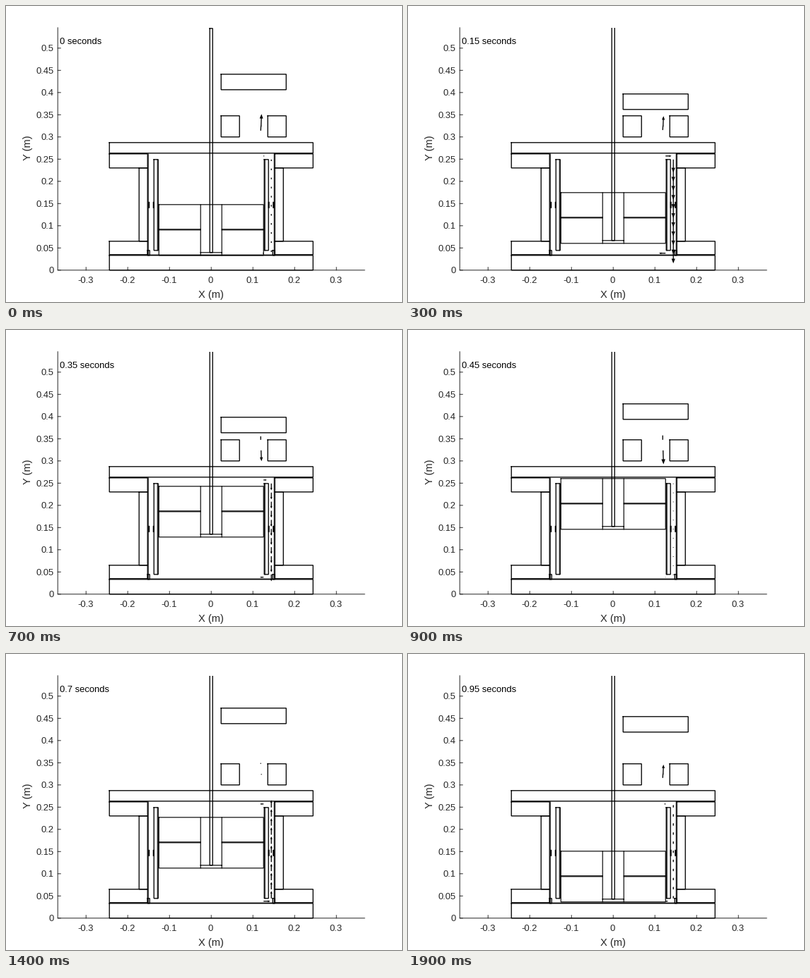
These frames come from a looping animation (560 by 420 pixels, 2000 ms). A matplotlib script:

```python
import numpy as np
import matplotlib.pyplot as plt
from matplotlib.animation import FuncAnimation
from matplotlib.collections import LineCollection, PolyCollection

W, H, DPI = 560, 420, 100
FRAMES, STEP = 20, 100
PX = 72 / DPI
GREY = "#262626"
LEFT, TOP, RIGHT, BASE, MID = 73, 30, 507, 374, 290
DX, DY = 0.2, 0.8  # where a whole coordinate falls inside its pixel
LINE = 1.33

plt.rcParams["font.family"] = "Liberation Sans"
plt.rcParams["path.snap"] = False
fig = plt.figure(figsize=(W / DPI, H / DPI), dpi=DPI, facecolor="white")
ax = fig.add_axes([0, 0, 1, 1])
ax.set_xlim(-DX, W - DX)
ax.set_ylim(H - DY, -DY)
ax.axis("off")


def path(xs, ys, color="black", width=LINE):
    return ax.plot(xs, ys, color=color, lw=width * PX, snap=False,
                   solid_capstyle="projecting", solid_joinstyle="miter")[0]


def box_points(x0, y0, x1, y1):
    return [x0, x1, x1, x0, x0], [y0, y0, y1, y1, y0]


def box(x0, y0, x1, y1):
    return path(*box_points(x0, y0, x1, y1))


def mirrored(x0, y0, x1, y1):
    box(x0, y0, x1, y1)
    box(2 * MID - x1, y0, 2 * MID - x0, y1)


def label(x, y, text, size=13, color=GREY, ha="center", va="baseline", **kw):
    """Text placed relative to pixel centres."""
    return ax.text(x - 0.5 - DX, y + 0.5 - DY, text, fontsize=size * PX,
                   color=color, ha=ha, va=va, **kw)


def draw_axes():
    path([LEFT, LEFT, RIGHT], [TOP, BASE, BASE], GREY, 1)
    for i in range(11):
        y = BASE - 31.5 * i
        path([LEFT, LEFT + 4], [y, y], GREY, 1)
        label(68, y + 5, f"{0.05 * i:g}", ha="right")
    for i in range(-3, 4):
        x = MID + 59 * i
        path([x, x], [BASE, BASE - 4], GREY, 1)
        label(x, 393, f"{0.1 * i:g}")
    label(MID, 414, "X (m)", 14.67)
    label(32, 201, "Y (m)", 14.67, va="center", rotation=90)


def draw_housing():
    box(146, 193, 434, 208)
    box(146, 353, 434, 374)
    path([200, 380], [352.5, 352.5])
    mirrored(146, 209, 200, 229)
    mirrored(188, 229, 200, 333)
    mirrored(146, 333, 200, 352)
    mirrored(200, 346, 203, 353)
    mirrored(209, 217, 215, 346)
    for x in (201, 214, 366, 379):
        y0, y1 = (209, 352) if x in (201, 379) else (217, 346)
        path([x, x], [y0, y1], width=1)
    for x in (202, 208.5, 371.5, 378):
        path([x, x], [278, 285], width=2)
    box(304, 155, 330, 185)
    box(370, 155, 396, 185)


draw_axes()
draw_housing()

clock = label(77, 54, "", color="black", ha="left")
shell, upper, lower, core = [path([], [], width=1.15) for _ in range(4)]
rod, block = path([], []), path([], [])
clip = plt.Rectangle((0, TOP), W, H, transform=ax.transData)
rod.set_clip_path(clip)
shafts = ax.add_collection(LineCollection([], colors="black",
                                          linewidths=LINE * PX,
                                          capstyle="butt"))
heads = ax.add_collection(PolyCollection([], facecolors="black",
                                         edgecolors="none"))
shafts.set_snap(False)


def arrow(x, y, dx, dy, segs, tris):
    """Add a shaft and a narrow filled head."""
    tail, step = np.array([x, y]), np.array([dx, dy])
    tip = tail + step
    neck = tip - 0.36 * step
    side = np.array([-dy, dx]) * 0.14
    segs.append([tail, tip - 0.15 * step])
    tris.append([tip, neck + side, neck - side])


def flow(a):
    """Gas speed in the regenerator duct, positive downwards."""
    return (1.5 + 15 * np.sin(a) + 2.5 * np.cos(a)
            + 3 * np.sin(2 * a) - 1.5 * np.cos(2 * a))


def duct_arrows(a, segs, tris):
    v = flow(a)
    for y in np.linspace(217, 346, 11):
        arrow(375, y, 0, v, segs, tris)
    arrow(364, 212, 0.45 * v, 0, segs, tris)
    arrow(364, 350, -(0.5 if v > 0 else 0.9) * v, 0, segs, tris)


def port_arrows(a, segs, tris):
    v = 28.26 * np.cos(a) - 0.77 * np.sin(a) + 8 * np.sin(2 * a)
    if abs(v) < 5:
        segs.append([(361, 169.5), (361, 170.5)])
    else:
        arrow(360.5, 170, 0.6, -0.62 * v, segs, tris)
    if v > 5:
        segs.append([(360, 171 + 0.18 * v), (360.4, 169)])
    if v < 12:
        segs.append([(360, 155), (360, 154.5 - 0.18 * max(-v, 0))])


def draw(i):
    a = 2 * np.pi * i / FRAMES
    clock.set_text(f"{0.05 * i:g} seconds")

    y = round(243.1 + 36.2 * np.cos(a) + 1.74 * np.cos(2 * a))
    shell.set_data(*box_points(216, y, 364, y + 72))
    for line, dy in ((upper, 35), (lower, 36)):
        line.set_data([216, 275, np.nan, 305, 364], [y + dy] * 5)
    core.set_data([275, 275, np.nan, 305, 305, np.nan, 275, 305],
                  [y, y + 72, np.nan, y, y + 72, np.nan, y + 68, y + 68])
    rod.set_data(*box_points(288, y - 250, 292, y + 68))

    p = round(99.5 + 28.26 * np.sin(a) + 0.77 * np.cos(a)
              - 4 * np.cos(2 * a))
    block.set_data(*box_points(304, p, 396, p + 22))

    segs, tris = [], []
    duct_arrows(a, segs, tris)
    port_arrows(a, segs, tris)
    shafts.set_segments(segs)
    heads.set_verts(tris)
    return clock, shell, upper, lower, core, rod, block, shafts, heads


anim = FuncAnimation(fig, draw, frames=FRAMES, interval=STEP,
                     init_func=lambda: draw(0), repeat=True, repeat_delay=0)
plt.show()
```
